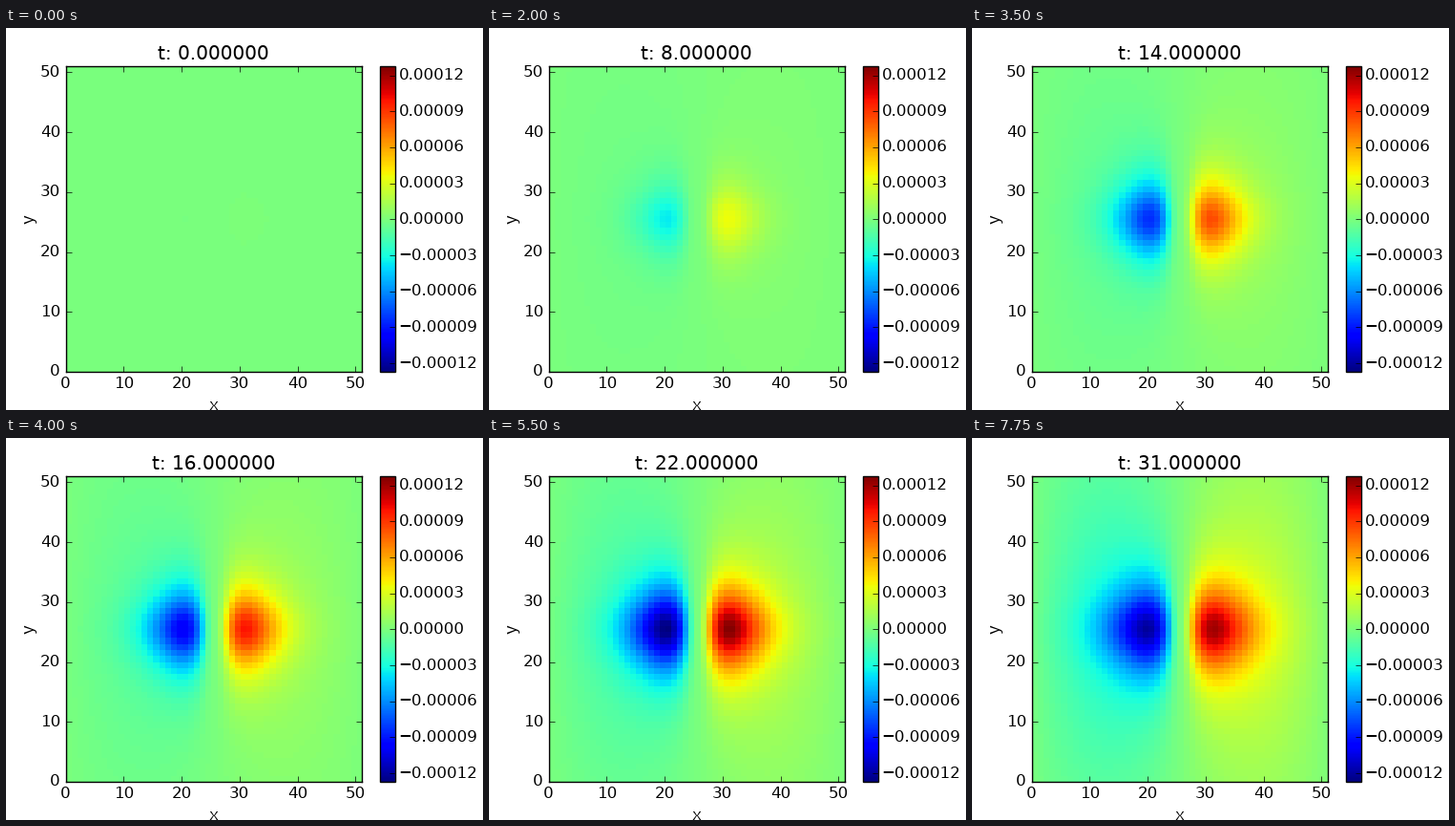
Animation, 500 px wide and 400 px high, one loop 8000 ms. Source, as a matplotlib script:

```python
import numpy as np
import matplotlib.pyplot as plt
from matplotlib.animation import FuncAnimation

plt.style.use("classic")
plt.rcParams.update({
    "figure.facecolor": "w",
    "font.family": "DejaVu Sans",
    "text.hinting": "native",
})

N = 51
STEPS = 32
UNIT = 1e-4
RISE = 23

cells = np.arange(N) - N // 2
dist = np.abs(cells)
sign = np.sign(cells)
dy = cells[:, None]


def peak(t):
    """Height of the lobes: eased rise, then a slow decline."""
    u = min(t / RISE, 1)
    return 0.007 + 1.27 * u * u * (3 - 2 * u) - 0.01 * max(t - RISE, 0)


def field(t):
    """Antisymmetric pair of lobes on top of a slowly spreading halo."""
    centre = 5 + 0.5 * t / STEPS
    sharpness = 2 + 1.8 * np.exp(-t / 11)
    height = 4.8 - 2 * np.exp(-t / 12)
    r = dist / centre
    core = (r * np.exp(1 - r)) ** sharpness / np.cosh(dy / height)

    level = 0.22 * (t / STEPS) ** 1.5
    halo = np.sin(np.pi * dist / 26) * np.exp(-(dy / 22) ** 2 / 2)

    return sign * ((peak(t) - 0.6 * level) * core + level * halo) * UNIT


fig, ax = plt.subplots(figsize=(5, 4), dpi=100)
image = ax.imshow(field(0), cmap="jet", vmin=-1.27 * UNIT, vmax=1.276 * UNIT,
                  origin="lower", extent=(0, N, 0, N), aspect="auto",
                  interpolation="nearest")
ax.set_xticks(range(0, N, 10))
ax.set_yticks(range(0, N, 10))
ax.tick_params(axis="x", pad=2.6)
ax.set_xlabel("x", labelpad=4.4)
ax.set_ylabel("y", labelpad=2.6)
title = ax.set_title("")

bar = fig.colorbar(image, ax=ax)
levels = np.arange(-4, 5) * 3e-5
bar.set_ticks(levels)
bar.set_ticklabels([f"{v:.5f}".replace("-", "\u2212") for v in levels])
bar.ax.tick_params(pad=2.6)


def draw(t):
    image.set_data(field(t))
    title.set_text(f"t: {t:.6f}")
    return image, title


anim = FuncAnimation(fig, draw, frames=STEPS, interval=250, repeat=True,
                     repeat_delay=0, blit=False)
plt.show()
```
